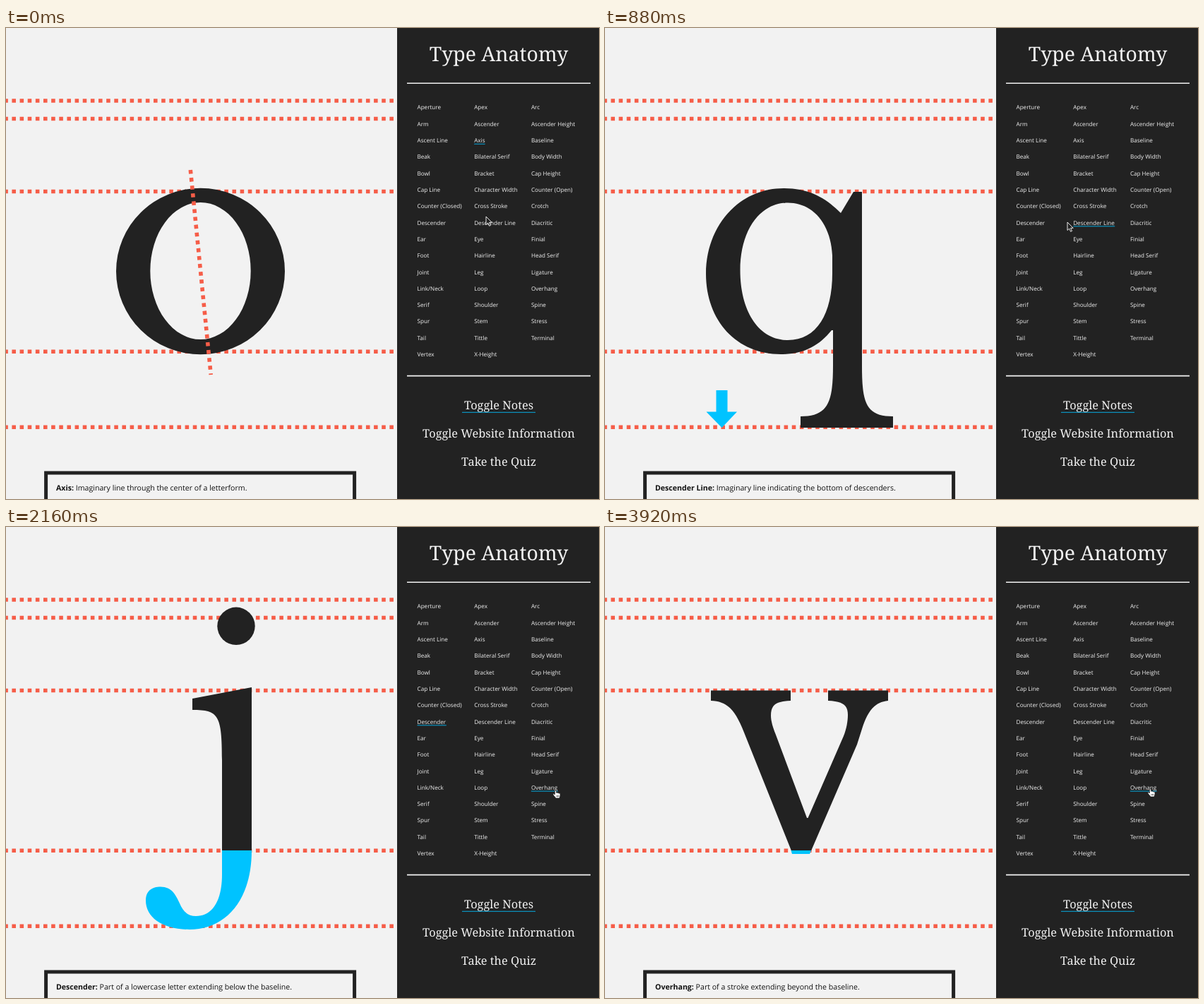
Animation of 840x667 px, one loop 4 s. Source, as an HTML page:

```html
<!DOCTYPE html>
<html lang="en">
<head>
<meta charset="utf-8">
<title>Type Anatomy</title>
<style>
  html, body { margin: 0; width: 100%; height: 100%; overflow: hidden; background: #f2f2f2; }
  svg { display: block; width: 100%; height: 100%; }
  text { font-family: "Open Sans", sans-serif; text-rendering: geometricPrecision; white-space: pre; }
  .serif { font-family: "Noto Serif", serif; font-size: 16.35px; text-anchor: middle; fill: #f2f2f2; }
  .serif.title { font-size: 28.4px; }
  .link { font-size: 8.15px; fill: #f2f2f2; }
  .note { font-size: 10.6px; fill: #111; }
  .bold { font-weight: 700; }
  .dots { stroke: #f65d48; stroke-width: 5.6; stroke-dasharray: 5.57 5.575; fill: none; }
  .ink { fill: #222; fill-rule: evenodd; }
  .blue { fill: #00c3ff; }
  .under { stroke: #06a9df; stroke-width: 1; }
  .rule { stroke: #f2f2f2; stroke-width: 1.6; }
</style>
</head>
<body>
<svg viewBox="0 0 840 667" preserveAspectRatio="none">
  <rect width="840" height="667" fill="#f2f2f2"/>
  <g id="guides"></g>

  <g id="axis">
    <path class="ink" d="M156 344.5a119.5 117.7 0 1 0 239 0a119.5 117.7 0 1 0 -239 0Z
      M204.3 344a71.2 97 0 1 0 142.4 0a71.2 97 0 1 0 -142.4 0Z"/>
    <path class="dots" d="M261.3 201L290.2 491"/>
  </g>

  <g id="line">
    <path class="ink" d="M352 232H364V478C364 530 369 550 408 550V566H277V550C316 550 323 530 323 478V428H321
      C303 450 282 462 249 462C187 462 143 415 143 348C143 280 190 227 253 227C289 227 312 240 334 262Z
      M259 247.5C219 247.5 191.5 287 191.5 343C191.5 400 217 442 259 442C300 442 322 405 322 347V322
      C320 278 295 247.5 259 247.5Z"/>
    <path class="blue" d="M157.5 513H173.5V543.5H187L165.5 566L143.5 543.5H157.5Z"/>
  </g>

  <g id="descender">
    <circle class="ink" cx="326" cy="140.3" r="26.7"/>
    <path class="ink" d="M348 227L264 243V259C301 259 306 266 306 330V458.5H348Z"/>
    <path class="blue" d="M306 458H348C348 530 310 570 260 570C222 570 198 553 198 529C198 515 207 509.5 219 509.5
      C235 510 240 520 246 533C251 545 258 551 269 551C292 551 306 530 306 492Z"/>
  </g>

  <g id="overhang">
    <path class="ink" d="M150 231.5H263V246C242 247 235 252 235 267C235 275 238 284 241.5 293L286 412H287.5L338 296
      C342 286 344 275 344 266C344 252 337 247 316 246V231.5H401V246C380 248 371 264 364 286L357 308L292 458.5H264
      L197 291C184 258 173 247 150 246Z"/>
    <path class="blue" d="M263.5 458H292L290 463H265Z"/>
  </g>

  <rect x="56.6" y="630" width="437" height="60" fill="#f2f2f2" stroke="#222" stroke-width="5"/>
  <text class="note" x="71" y="655.3"><tspan class="bold" id="term"></tspan><tspan id="meaning"></tspan></text>

  <rect x="554" width="286" height="667" fill="#222"/>
  <path class="rule" d="M568 78.3H828M568 492.6H828"/>
  <text class="serif title" x="698" y="47">Type Anatomy</text>
  <text class="serif" x="698" y="539.5">Toggle Notes</text>
  <path class="under" d="M646 544.3H750" stroke-width="1.3"/>
  <text class="serif" x="698" y="579.8">Toggle Website Information</text>
  <text class="serif" x="698" y="620">Take the Quiz</text>
  <g id="links"></g>

  <path id="arrow" d="M0 0V11.5L2.7 9.1L4.6 13.3L6.5 12.4L4.7 8.3H8.2Z" fill="#222" stroke="#fff" stroke-width=".9"/>
  <path id="hand" d="M-1.1 .9C-1.1 -.4 .9 -.4 .9 .9V3.4C1.3 2.7 2.7 2.8 2.8 3.8C3.3 3.1 4.7 3.3 4.7 4.4
    C5.3 3.8 6.5 4.2 6.5 5.2V7.3C6.5 9 5.6 9.5 5.4 11H.2C-.3 9.5 -2.4 8 -3.5 6.1C-3.9 5 -2.6 4.4 -1.8 5.2L-1.1 6Z
    M1.4 7V9.3M3 7V9.3M4.5 7V9.3" fill="#fff" stroke="#111" stroke-width=".6"/>
</svg>
<script>
const LOOP = 4000, STEP = 80;
const NS = "http://www.w3.org/2000/svg";
const $ = id => document.getElementById(id);

function add(parent, tag, attrs, text = "") {
  const el = document.createElementNS(NS, tag);
  for (const k in attrs) el.setAttribute(k, attrs[k]);
  el.textContent = text;
  return parent.appendChild(el);
}

const show = (el, on) => el.setAttribute("visibility", on ? "visible" : "hidden");

for (const y of [103, 128.5, 231.5, 458.2, 565.2])
  add($("guides"), "path", { class: "dots", d: `M-2.74 ${y}H549.2` });

const names = `Aperture,Apex,Arc,Arm,Ascender,Ascender Height,Ascent Line,Axis,Baseline,Beak,Bilateral Serif,Body Width,
Bowl,Bracket,Cap Height,Cap Line,Character Width,Counter (Open),Counter (Closed),Cross Stroke,Crotch,
Descender,Descender Line,Diacritic,Ear,Eye,Finial,Foot,Hairline,Head Serif,Joint,Leg,Ligature,
Link/Neck,Loop,Overhang,Serif,Shoulder,Spine,Spur,Stem,Stress,Tail,Tittle,Terminal,Vertex,X-Height`
  .split(",").map(s => s.trim());

const links = names.map((name, i) => {
  const x = 582.5 + (i % 3) * 80.7;
  const y = 115.3 + Math.floor(i / 3) * 23.32;
  const box = add($("links"), "text", { class: "link", x, y }, name).getBBox();
  const line = add($("links"), "path", { class: "under", d: `M${x} ${y + 2.3}h${box.width}` });
  return { name, box, line };
});

const scenes = [
  { at: 0, id: "axis", term: "Axis", meaning: "Imaginary line through the center of a letterform." },
  { at: 400, id: "line", term: "Descender Line", meaning: "Imaginary line indicating the bottom of descenders." },
  { at: 1600, id: "descender", term: "Descender", meaning: "Part of a lowercase letter extending below the baseline." },
  { at: 3200, id: "overhang", term: "Overhang", meaning: "Part of a stroke extending beyond the baseline." }
];

// Pointer stops: time, x, y
const stops = [
  [0, 680, 267], [240, 682.5, 273], [480, 682.5, 273], [880, 655, 275], [1120, 622, 275],
  [1440, 610, 274.5], [1600, 611, 274.5], [2080, 779, 373], [2160, 778.5, 373],
  [2640, 774.5, 371], [3760, 774.5, 371], [3920, 772.5, 371], [LOOP, 772.5, 371]
];

function pointer(t) {
  const i = stops.findIndex(s => s[0] > t);
  const [t0, x0, y0] = stops[i - 1], [t1, x1, y1] = stops[i];
  const u = (t - t0) / (t1 - t0), k = u * u * (3 - 2 * u);
  return [x0 + (x1 - x0) * k, y0 + (y1 - y0) * k];
}

const inside = (b, x, y) => x >= b.x && x <= b.x + b.width && y >= b.y && y <= b.y + b.height;

function draw(ms) {
  const t = Math.floor((ms % LOOP) / STEP) * STEP;
  const scene = scenes.filter(s => s.at <= t).pop();
  for (const s of scenes) show($(s.id), s === scene);
  $("term").textContent = scene.term + ":";
  $("meaning").textContent = " " + scene.meaning;

  const [x, y] = pointer(t);
  const hover = links.find(l => inside(l.box, x, y));
  for (const l of links) show(l.line, l === hover || l.name === scene.term);
  for (const id of ["arrow", "hand"]) {
    $(id).setAttribute("transform", `translate(${x} ${y})`);
    show($(id), (id === "hand") === !!hover);
  }
}

const start = performance.now();
function tick() {
  draw(performance.now() - start);
  requestAnimationFrame(tick);
}
tick();
</script>
</body>
</html>
```
